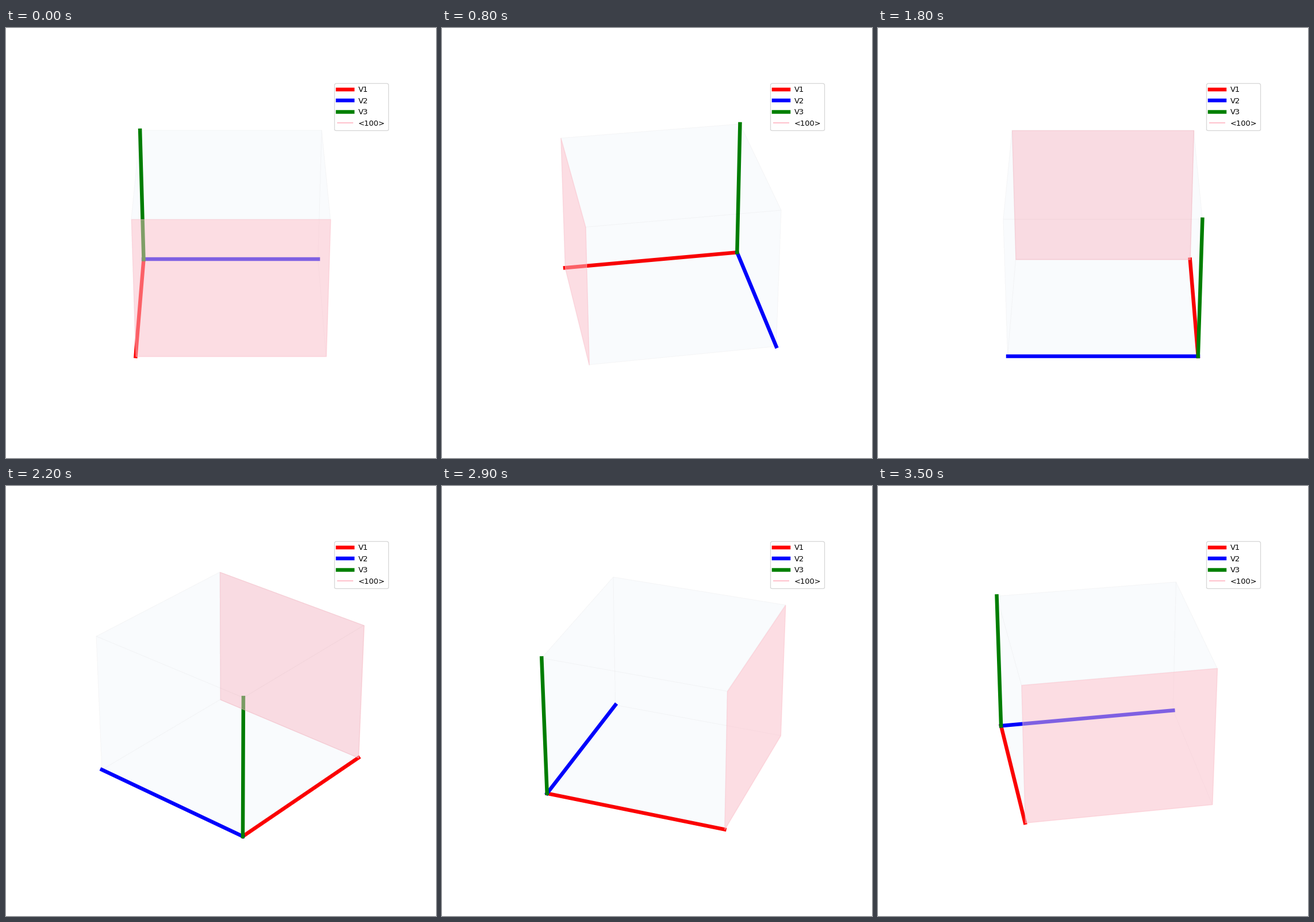
These frames come from a looping animation (748x748 px, 3.6 s). A matplotlib script:

```python
from itertools import product

import matplotlib.pyplot as plt
from matplotlib.animation import FuncAnimation
from matplotlib.colors import to_rgba
from mpl_toolkits.mplot3d.art3d import Poly3DCollection

SIZE, INCHES = 748, 8
FRAMES, INTERVAL = 36, 100


def face(axis, level):
    """Corners of the unit cube's side where the given axis equals level."""
    corners = [[0, 0], [1, 0], [1, 1], [0, 1]]
    for c in corners:
        c.insert(axis, level)
    return corners


def add_faces(faces, fill, edge, alpha):
    ax.add_collection3d(Poly3DCollection(
        faces, facecolors=to_rgba(fill, alpha),
        edgecolors=to_rgba(edge, alpha), linewidths=1))


fig = plt.figure(figsize=(INCHES, INCHES), dpi=SIZE / INCHES)
ax = fig.add_subplot(projection="3d")

# Basis vectors
for i, color in enumerate(["red", "blue", "green"]):
    tip = [[0, int(i == k)] for k in range(3)]
    ax.plot(*tip, color=color, lw=5, label=f"V{i + 1}")
ax.plot([], [], [], color="pink", label="<100>")

# Faint unit cube and the highlighted plane
add_faces([face(*side) for side in product(range(3), (0, 1))], "C0", "k", 0.01)
add_faces([face(0, 1)], "pink", "pink", 0.5)

ax.set(xlim=(-0.05, 1.05), ylim=(-0.05, 1.05), zlim=(0, 1))
ax.set_box_aspect((4, 4, 3), zoom=0.96)
ax.set_axis_off()
ax.legend(loc="upper right")


def update(i):
    ax.view_init(elev=30, azim=i * 360 / FRAMES)
    return []


anim = FuncAnimation(fig, update, frames=FRAMES, interval=INTERVAL,
                     repeat=True, repeat_delay=0)
plt.show()
```
